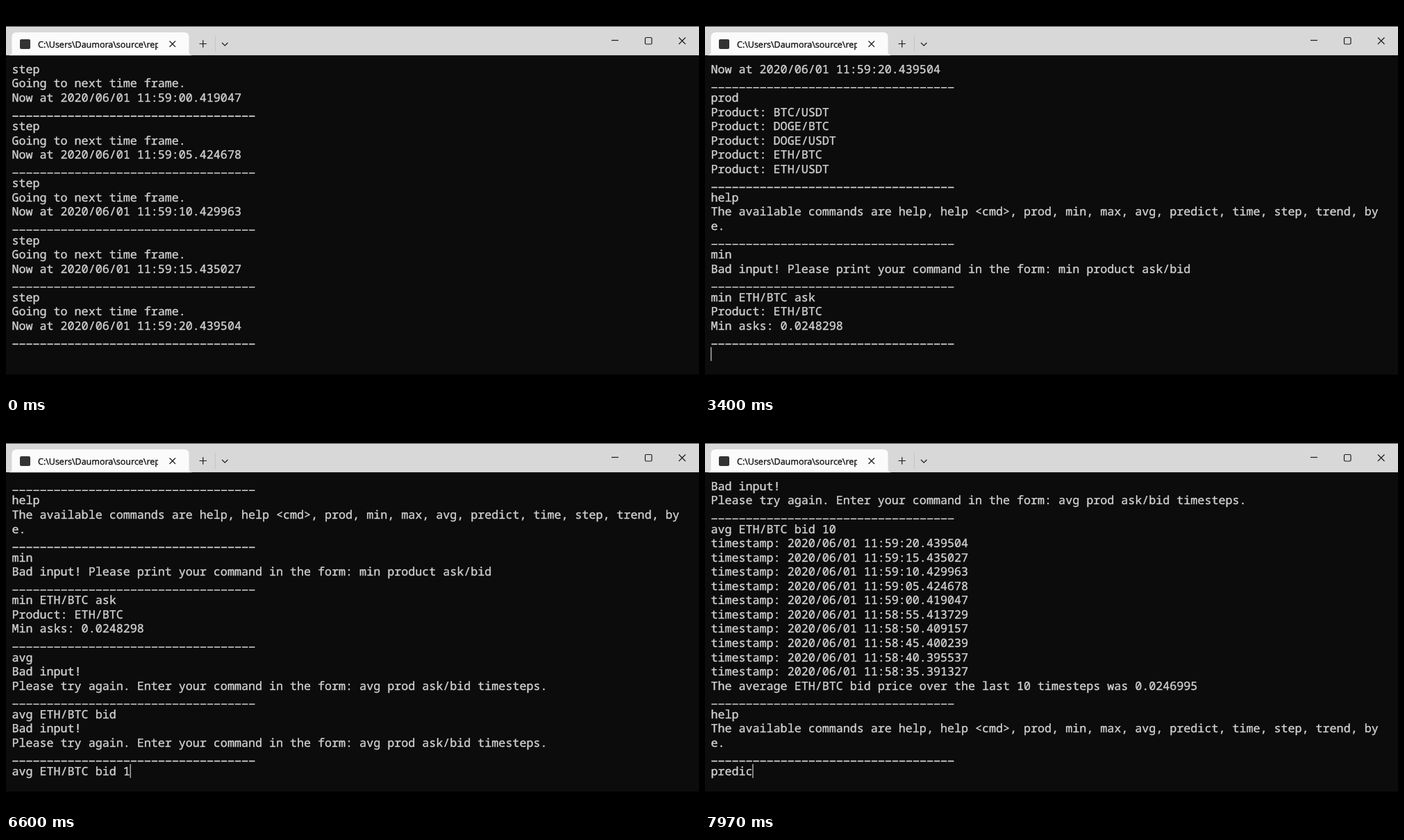
Recreate the animation shown at these times as an HTML page. Size 998x561 px, loop 8000 ms.

```html
<!DOCTYPE html>
<html lang="en">
<head>
<meta charset="utf-8">
<title>Terminal session</title>
<style>
  html, body { margin: 0; width: 100%; height: 100%; overflow: hidden; background: #000; }
  svg { display: block; width: 100%; height: 100%; }
  text { text-rendering: geometricPrecision; stroke-width: 0.35; }
  .title { font: 500 12.5px "Open Sans", "Noto Sans", sans-serif; fill: #111; stroke: #111; }
  .icon { fill: none; stroke: #1c1c1c; stroke-width: 1.2; }
  .row text { font: 16.7px "Noto Sans Mono", "DejaVu Sans Mono", monospace; fill: #d2d2d2; stroke: #d2d2d2; white-space: pre; }
  .row path { stroke: #d2d2d2; stroke-width: 1.6; stroke-dasharray: 8.42 1.6; }
</style>
</head>
<body>
<svg viewBox="0 0 998 561">
  <clipPath id="titleClip"><rect x="46" y="40" width="173" height="30"/></clipPath>
  <rect width="998" height="561"/>
  <rect y="29.5" width="998" height="42" fill="#d8d8d8"/>
  <rect y="71.2" width="998" height="460.3" fill="#0c0c0c"/>
  <path d="M4 71.2Q8.500 71.2 8.500 66V45Q8.500 38 15.500 38H256.500Q263.500 38 263.500 45V66Q263.500 71.2 268 71.2Z" fill="#fbfbfb"/>
  <rect x="20" y="48" width="15" height="14" rx="2" fill="#333"/>
  <text class="title" x="46" y="60" clip-path="url(#titleClip)">C:\Users\Daumora\source\rep</text>
  <g class="icon">
    <path d="M235.500 50.500l8.500 8.500m0-8.500l-8.500 8.500"/>
    <path d="M278.500 54.500h10.500m-5.250-5.250v10.500"/>
    <path d="M301.500 43v23" stroke="#c4c4c4" stroke-width="1"/>
    <path d="M311 53l4.200 4.200l4.200-4.200"/>
    <path d="M872 49.500h10"/>
    <rect x="920.500" y="45.500" width="9.500" height="9.500" rx="1.500"/>
    <path d="M969 45.500l9.500 9.500m0-9.500l-9.500 9.500"/>
  </g>
  <g id="screen"></g>
  <rect id="cursor" width="1.200" height="20" fill="#d2d2d2"/>
</svg>
<script>
const LOOP = 8000, ROWS = 21, LEFT = 8.5, CELL = 10.02, PITCH = 20.55, BLINK = 150;
const RULE = "_".repeat(35);
const DAY = "2020/06/01 ";
const baseline = row => 96.9 + row * PITCH;

const stamps = ["11:59:20.439504", "11:59:15.435027", "11:59:10.429963", "11:59:05.424678",
  "11:59:00.419047", "11:58:55.413729", "11:58:50.409157", "11:58:45.400239",
  "11:58:40.395537", "11:58:35.391327"];
const history = stamps.slice(0, 5).reverse().flatMap(stamp =>
  ["step", "Going to next time frame.", "Now at " + DAY + stamp, RULE]);

const products = ["BTC/USDT", "DOGE/BTC", "DOGE/USDT", "ETH/BTC", "ETH/USDT"].map(p => "Product: " + p);
const help = ["The available commands are help, help <cmd>, prod, min, max, avg, predict, time, step, trend, by", "e."];
const badAvg = ["Bad input!", "Please try again. Enter your command in the form: avg prod ask/bid timesteps."];
const average = [...stamps.map(s => "timestamp: " + DAY + s),
  "The average ETH/BTC bid price over the last 10 timesteps was 0.0246995"];

// "<" in a key sequence is a backspace; pace is the delay between printed lines
const session = [
  { keys: "prod", start: 330, gap: 80, enter: 700, out: products },
  { keys: "help", start: 880, gap: 70, enter: 1210, out: help },
  { keys: "min", start: 1680, gap: 80, enter: 1960,
    out: ["Bad input! Please print your command in the form: min product ask/bid"] },
  { keys: "min ETH/BTC ask", start: 2250, gap: 65, enter: 3270,
    out: ["Product: ETH/BTC", "Min asks: 0.0248298"] },
  { keys: "avg", start: 3700, gap: 80, enter: 4020, out: badAvg },
  { keys: "avg ETH/BTC bid", start: 4530, gap: 55, enter: 5380, out: badAvg },
  { keys: "avg ETH/T<BTC bid 10", start: 5570, gap: 55, enter: 6640, out: average, pace: 30 },
  { keys: "help", start: 7110, gap: 65, enter: 7400, out: help },
  { keys: "predict", start: 7650, gap: 60, enter: LOOP, out: [] }
];

function stateAt(t) {
  const lines = [...history];
  let typed = "", last = -200;
  for (const { keys, start, gap, enter, out, pace = 0 } of session) {
    if (t < start) break;
    typed = "";
    [...keys].forEach((key, i) => {
      const at = start + i * gap;
      if (at > t) return;
      typed = key === "<" ? typed.slice(0, -1) : typed + key;
      last = at;
    });
    if (t < enter) break;
    lines.push(typed);
    typed = "";
    [...out, RULE].forEach((line, i) => {
      const at = enter + i * pace;
      if (at > t) return;
      lines.push(line);
      last = at;
    });
  }
  return { rows: [...lines.slice(1 - ROWS), typed], typed, lit: (t - last) % (2 * BLINK) < BLINK };
}

function add(parent, tag, attrs) {
  const node = document.createElementNS("http://www.w3.org/2000/svg", tag);
  for (const name in attrs) node.setAttribute(name, attrs[name]);
  return parent.appendChild(node);
}

const screen = document.getElementById("screen");
const cursor = document.getElementById("cursor");
cursor.setAttribute("y", baseline(ROWS - 1) - 16);

const cells = Array.from({ length: ROWS }, (_, row) => {
  const group = add(screen, "g", { class: "row" });
  return {
    text: add(group, "text", { x: LEFT, y: baseline(row) }),
    rule: add(group, "path", { d: `M${LEFT + 0.8} ${baseline(row) + 0.3}h${RULE.length * CELL - 1.6}` })
  };
});

function draw(now) {
  const { rows, typed, lit } = stateAt(now % LOOP);
  cells.forEach(({ text, rule }, i) => {
    const isRule = rows[i] === RULE;
    const content = isRule ? "" : rows[i];
    if (text.textContent !== content) text.textContent = content;
    rule.style.display = isRule ? "" : "none";
  });
  cursor.setAttribute("x", LEFT + typed.length * CELL - 0.3);
  cursor.style.display = lit ? "" : "none";
}

const origin = performance.now();
function tick() {
  draw(performance.now() - origin);
  requestAnimationFrame(tick);
}
tick();
</script>
</body>
</html>
```
